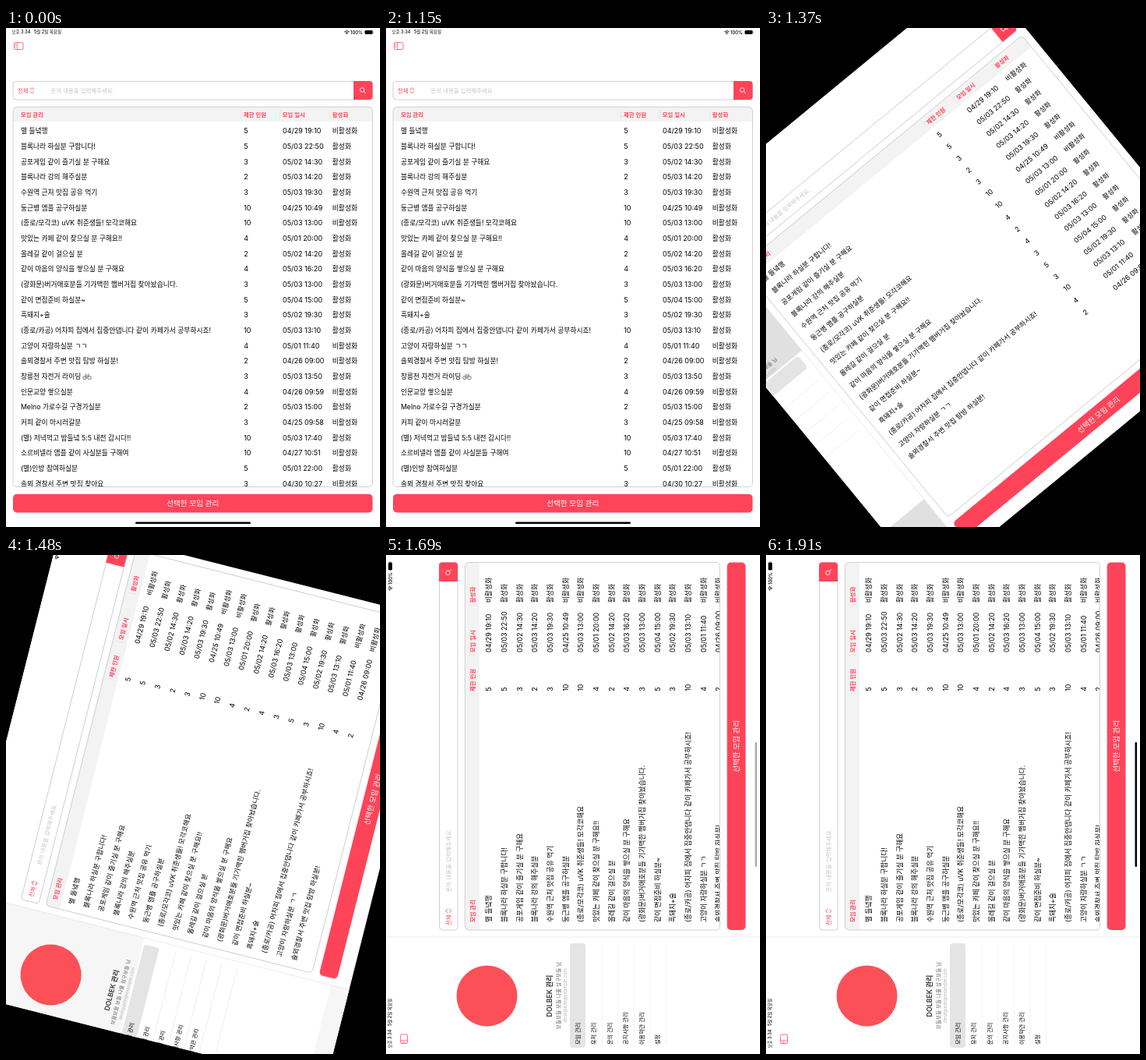
Recreate the animation shown at these times as an HTML page. Size 480 by 640 pixels, loop 2.7 s.

```html
<!DOCTYPE html>
<html lang="ko">
<head>
<meta charset="utf-8">
<title>모임 관리</title>
<style>
html, body { margin: 0; width: 100%; height: 100%; overflow: hidden; background: #000; }
svg { font-family: Inter, "Noto Sans CJK KR", "Noto Sans CJK", sans-serif; }
#stage { display: block; width: 100vw; height: 100vh; }
text { white-space: pre; }
</style>
</head>
<body>
<svg id="stage" viewBox="0 0 480 640"></svg>
<script>
const NS = 'http://www.w3.org/2000/svg';
const RED = '#ff4459', EDGE = '#c6c6c6', INK = '#000';
const LOOP = 2700, SIDE = 150, PITCH = 19.66;

const rows = [
  ['별 들녘행', 5, '04/29 19:10', 0],
  ['블록나라 하실분 구합니다!', 5, '05/03 22:50', 1],
  ['공포게임 같이 즐기실 분 구해요', 3, '05/02 14:30', 1],
  ['블록나라 강의 해주실분', 2, '05/03 14:20', 1],
  ['수원역 근처 맛집 공유 먹기', 3, '05/03 19:30', 1],
  ['둥근병 앰플 공구하실분', 10, '04/25 10:49', 0],
  ['(종로/모각코) uVK 취준생들! 모각코해요', 10, '05/03 13:00', 0],
  ['맛있는 카페 같이 찾으실 분 구해요!!', 4, '05/01 20:00', 1],
  ['올레길 같이 걸으실 분', 2, '05/02 14:20', 1],
  ['같이 마음의 양식을 쌓으실 분 구해요', 4, '05/03 16:20', 1],
  ['(광화문)버거애호분들 기가맥힌 햄버거집 찾아놨습니다.', 3, '05/03 13:00', 1],
  ['같이 면접준비 하실분~', 5, '05/04 15:00', 1],
  ['흑돼지+술', 3, '05/02 19:30', 1],
  ['(종로/카공) 어차피 집에서 집중안댑니다 같이 카페가서 공부하시죠!', 10, '05/03 13:10', 1],
  ['고양이 자랑하실분 ㄱㄱ', 4, '05/01 11:40', 0],
  ['솔뫼경찰서 주변 맛집 탐방 하실분!', 2, '04/26 09:00', 0],
  ['창릉천 자전거 라이딩', 3, '05/03 13:50', 1],
  ['인문교양 쌓으실분', 4, '04/26 09:59', 0],
  ['Melno 가로수길 구경가실분', 2, '05/03 15:00', 1],
  ['커피 같이 마시러갈분', 3, '04/25 09:58', 0],
  ['(별) 저녁먹고 밤들녘 5:5 내전 갑시다!!', 10, '05/03 17:40', 1],
  ['소르비넬라 앰플 같이 사실분들 구해여', 10, '04/27 10:51', 0],
  ['(별)인방 참여하실분', 5, '05/01 22:00', 1],
  ['솔뫼 경찰서 주변 맛집 찾아요', 3, '04/30 10:27', 0]
];
const landscapeRows = 16;

// start time, share of the quarter turn, home bar opacity
const steps = [
  [0, 0, 1], [1260, 0.082, 0], [1370, 0.438, 0], [1480, 0.842, 0],
  [1580, 0.995, 0], [1690, 1, 0.33], [1800, 1, 0.67], [1910, 1, 1]
];

function add(parent, tag, attrs = {}) {
  const el = document.createElementNS(NS, tag);
  set(el, attrs);
  parent.appendChild(el);
  return el;
}
function set(el, attrs) {
  for (const key in attrs) el.setAttribute(key, attrs[key]);
}
function rect(parent, x, y, width, height, fill, rx = 0) {
  return add(parent, 'rect', { x, y, width, height, fill, rx });
}
function line(parent, d, stroke, width = 0.7) {
  return add(parent, 'path', {
    d, stroke, fill: 'none', 'stroke-width': width,
    'stroke-linecap': 'round', 'stroke-linejoin': 'round'
  });
}
// y is the visual middle of the line
function label(parent, str, x, y, size, fill = INK, weight = 400, anchor = 'start') {
  const el = add(parent, 'text', {
    x, y: y + size * 0.365, 'font-size': size, fill,
    'font-weight': weight, 'text-anchor': anchor
  });
  el.textContent = str;
  return el;
}
function shift(el, x, y = 0) {
  set(el, { transform: `translate(${x} ${y})` });
}

const stage = document.getElementById('stage');
rect(stage, 0, 0, 480, 640, '#000');
const corners = rect(add(stage, 'clipPath', { id: 'corners' }), 0, 0, 480, 640, '#000');
const turn = add(stage, 'g');
const win = add(add(turn, 'g', { 'clip-path': 'url(#corners)' }), 'svg', { overflow: 'hidden' });
rect(win, 0, 0, 640, 640, '#fff');

// Side menu
const side = add(win, 'g');
const shadeTop = rect(side, 0, 0, SIDE, 234, '#fff');
const shadeEnd = rect(side, 0, 481, SIDE, 160, '#fff');
line(side, 'M150 0V640', '#e4e4e4');
add(side, 'circle', { cx: 74.5, cy: 129.5, r: 39, fill: '#fb5058' });
label(side, 'DOLBEK 관리', 74.5, 210, 8.8, '#333', 600, 'middle');
label(side, '보들보들 보들 나풀 살구보들 님', 75, 221.5, 6.6, '#666', 400, 'middle');
label(side, 'deskguide@example.com', 75, 229.5, 5.7, '#b4b4b4', 400, 'middle');
rect(side, 8, 236, 134, 20, '#e4e4e5', 4);
['모임 관리', '유저 관리', '문의 관리', '공지사항 관리', '이용약관 관리', '설정'].forEach((name, i) => {
  label(side, name, 12, 246 + i * 20.5, 7.2);
  if (i) line(side, `M13 ${256.8 + i * 20.5}H142`, '#e9e9e9', 0.6);
});

// Search and table, left-anchored parts
const main = add(win, 'g');
const search = add(main, 'rect', { x: 9, y: 68.5, height: 23.5, rx: 4, fill: '#fff', stroke: EDGE, 'stroke-width': 0.8 });
label(main, '전체', 15, 80.3, 7.4, RED);
line(main, 'M31.3 78.8L33.5 76.6L35.7 78.8M31.3 81.6L33.5 83.8L35.7 81.6', RED, 0.9);
label(main, '문의 내용을 입력해주세요.', 57.5, 80.3, 7.4, '#c4c4c6');
const head = add(main, 'path', { fill: '#f3f3f3' });
label(main, '모임 관리', 18.9, 111, 7.4, RED, 600);

// Right-anchored parts, x measured from the right edge
const right = add(win, 'g');
add(right, 'path', { d: 'M-34 68H-13.5Q-9.5 68 -9.5 72V88Q-9.5 92 -13.5 92H-34Z', fill: RED });
add(right, 'circle', { cx: -22.8, cy: 79.4, r: 2.7, fill: 'none', stroke: '#fff', 'stroke-width': 0.9 });
line(right, 'M-20.7 81.5L-18.6 83.6', '#fff', 1);
[['제한 인원', -175], ['모임 일시', -125.3], ['활성화', -61.2]].forEach(([name, x]) => {
  line(right, `M${x - 3} 106V116`, '#dcdcdc', 0.6);
  label(right, name, x, 111, 7.4, RED, 600);
});

// Table body
const body = add(win, 'svg', { x: 0, y: 101, overflow: 'hidden' });
const names = add(body, 'g'), facts = add(body, 'g');
const lateRows = [add(names, 'g'), add(facts, 'g')];
rows.forEach(([name, count, date, active], i) => {
  const late = i >= landscapeRows;
  const left = late ? lateRows[0] : names, end = late ? lateRows[1] : facts;
  const y = 31.2 + i * PITCH;
  label(left, name, 18.9, y, 8.75);
  label(end, count, -174.8, y, 9);
  label(end, date, -125, y, 9);
  label(end, active ? '활성화' : '비활성화', -61.2, y, 8.75);
});
const bike = add(lateRows[0], 'g');
shift(bike, 104, 31.8 + 16 * PITCH);
for (const cx of [-3, 3]) {
  add(bike, 'circle', { cx, cy: 1.2, r: 2.3, fill: 'none', stroke: '#444', 'stroke-width': 0.7 });
}
line(bike, 'M-3 1.2L-1.4 -2.2H2L0 1.2H-3M0 1.2L-1.6 -3.2M-2.4 -3.2H-0.8M3 1.2L1.6 -3.6H2.8', '#777', 0.6);
const frame = add(win, 'rect', { y: 101.3, rx: 5, fill: 'none', stroke: EDGE, 'stroke-width': 0.8 });

// Bottom button and home bar
const foot = add(win, 'g');
const button = rect(foot, 9, -42.3, 462, 23.8, RED, 5);
const buttonText = label(foot, '선택한 모임 관리', 240, -30.5, 9.6, '#fff', 400, 'middle');
const home = rect(foot, 166, -6.4, 148, 2.5, '#000', 1.25);

// Status bar
label(win, '오후 3:34', 7.5, 5.4, 5.5, INK, 500);
label(win, '5월 2일 목요일', 36, 5.4, 5.5, INK, 500);
const status = add(win, 'g');
line(status, 'M-45.4 4.6Q-42.6 2.2 -39.8 4.6M-44.2 6Q-42.6 4.7 -41 6', INK, 0.9);
add(status, 'circle', { cx: -42.6, cy: 7.3, r: 0.8, fill: INK });
label(status, '100%', -38, 5.4, 5.8, INK, 500);
rect(status, -19.5, 3, 10, 5, INK, 1.3);
rect(status, -9, 4.6, 0.8, 1.8, '#777', 0.4);

const toggle = add(win, 'g');
add(toggle, 'rect', { x: 10.5, y: 18.7, width: 11.5, height: 8.8, rx: 1.3, fill: 'none', stroke: RED, 'stroke-width': 0.8 });
line(toggle, 'M14.6 18.7V27.5M11.8 20.8H13.2M11.8 22.4H13.2M11.8 24H13.2', RED, 0.6);

function pose(p, barOpacity) {
  const W = 480 + 160 * p, H = 640 - 160 * p;
  const x0 = SIDE * p, tableW = W - x0 - 18.5, tableH = H - 152.5;
  const turning = p > 0 && p < 1;
  set(turn, { transform: `translate(240 320) rotate(${-90 * p}) translate(${-W / 2} ${-H / 2})` });
  set(win, { width: W, height: H });
  set(corners, { width: W, height: H, rx: turning ? 8 : 0 });

  shift(side, x0 - SIDE);
  const grey = Math.round(255 - 55 * (1 - p));
  for (const el of [shadeTop, shadeEnd]) set(el, { fill: `rgb(${grey},${grey},${grey})` });

  shift(main, x0);
  set(search, { width: tableW });
  const end = 9 + tableW;
  set(head, { d: `M9 120V106Q9 101.3 14 101.3H${end - 5}Q${end} 101.3 ${end} 106V120Z` });
  shift(right, W);
  shift(status, W);
  set(body, { width: W, height: tableH });
  shift(names, x0);
  shift(facts, W);
  for (const el of lateRows) set(el, { display: p ? 'none' : 'inline' });
  set(frame, { x: x0 + 9, width: tableW, height: tableH - 0.3 });

  shift(foot, 0, H);
  set(button, { x: x0 + 9, width: tableW });
  set(buttonText, { x: x0 + 9 + tableW / 2 });
  const homeW = 148 + 12 * p;
  set(home, { x: (W - homeW) / 2, width: homeW, opacity: barOpacity });
  shift(toggle, 3 * p);
}

const start = performance.now();
function tick() {
  const t = (performance.now() - start) % LOOP;
  const [, p, bar] = steps.filter(step => step[0] <= t).pop();
  pose(p, bar);
  requestAnimationFrame(tick);
}
tick();
</script>
</body>
</html>
```
